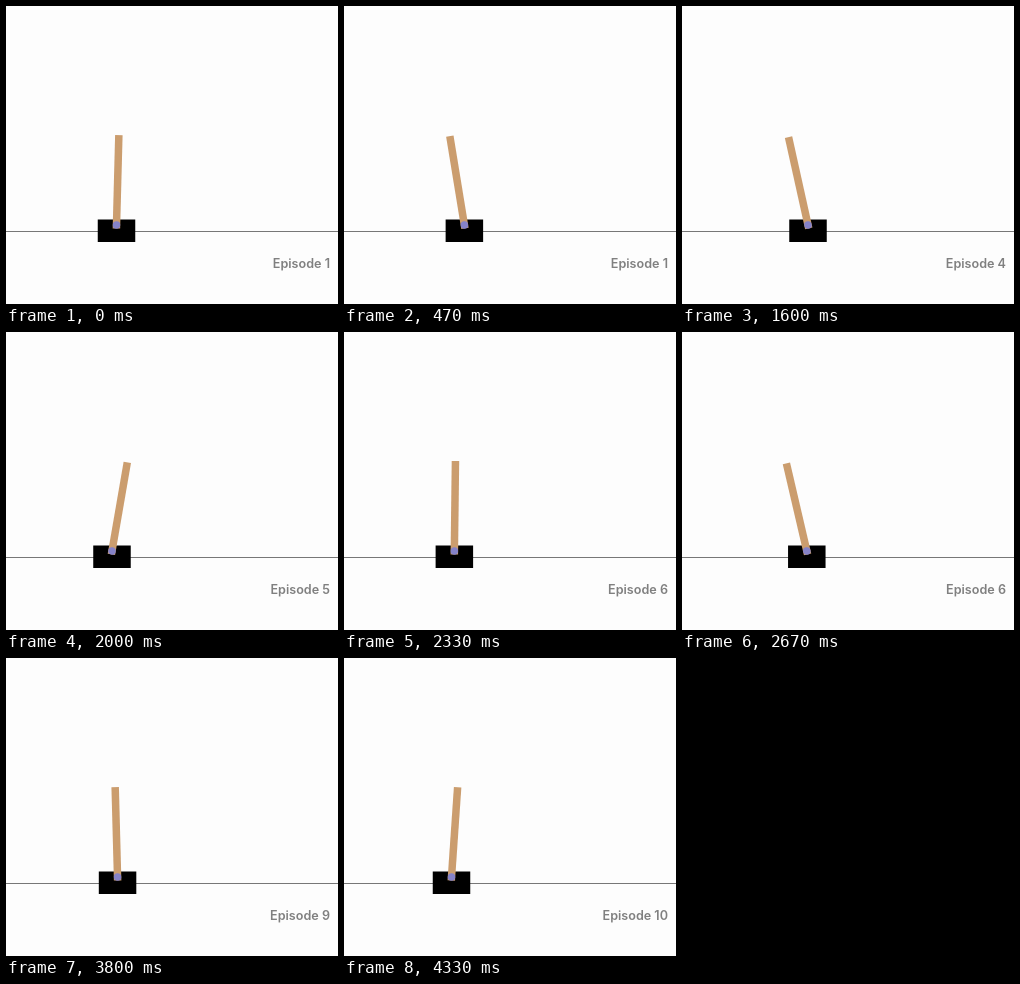
Recreate the animation shown at these times as an HTML page. Size 332x298 px, loop 4.39 s.

```html
<!DOCTYPE html>
<html lang="en">
<head>
<meta charset="utf-8">
<title>Cart and pole</title>
<style>
  html, body { margin: 0; width: 100%; height: 100%; overflow: hidden; background: #fdfdfd; }
  svg { display: block; width: 332px; height: 298px; }
  text { font: 600 12.6px Inter, "Liberation Sans", sans-serif; fill: #808080; text-anchor: end; }
</style>
</head>
<body>
<svg viewBox="0 0 332 298">
  <path d="M0 225.5H332" stroke="#777" />
  <g id="cart">
    <rect x="-18.75" y="213.5" width="37.5" height="22.5" />
    <g id="pole">
      <rect x="-3.75" y="129" width="7.5" height="93.5" fill="#cb9d6e" />
      <circle cy="219" r="3.75" fill="#8582c8" />
    </g>
  </g>
  <text id="label" x="324" y="262"></text>
</svg>
<script>
const LOOP = 4390, STEPS = 66, PIVOT = 219;
const $ = id => document.getElementById(id);
const cart = $('cart'), pole = $('pole'), label = $('label');

// first step, cart x from, to, power, pole angle from, to, power
const episodes = [
  [0, 110.5, 129.5, 4.9, 1.5, -14, 2.7],
  [9, 106, 85.5, 2, 1, 13, 2],
  [14, 112, 117.2, 2, -2, -11.9, 1.8],
  [18, 114, 126, 2.2, 1, -12.5, 2.2],
  [25, 109, 104.5, 2.2, 1, 13, 1.7],
  [32, 109, 124.8, 2.5, 2, -13.1, 2.5],
  [41, 110, 125, 2.5, -1, -13, 2.3],
  [49, 108.8, 122, 2.4, 1.5, -12.5, 2.3],
  [55, 110, 124, 2.4, 0, -12.5, 2.3],
  [61, 113, 107.5, 3.5, -1, 3.9, 2]
];

const starts = Array.from({ length: STEPS }, (_, i) => Math.round(i * 20 / 3) * 10);
const ease = (from, to, power, u) => from + (to - from) * u ** power;

function draw(time) {
  const t = time % LOOP;
  const step = starts.findLastIndex(s => s <= t);
  const n = episodes.findLastIndex(e => e[0] <= step);
  const [first, x0, x1, xp, a0, a1, ap] = episodes[n];
  const last = (n + 1 < episodes.length ? episodes[n + 1][0] : STEPS) - 1;
  const u = (step - first) / (last - first);
  cart.setAttribute('transform', `translate(${ease(x0, x1, xp, u)} 0)`);
  pole.setAttribute('transform', `rotate(${ease(a0, a1, ap, u)} 0 ${PIVOT})`);
  label.textContent = `Episode ${n + 1}`;
}

const begin = performance.now();
function tick() {
  draw(performance.now() - begin);
  requestAnimationFrame(tick);
}
tick();
</script>
</body>
</html>
```
